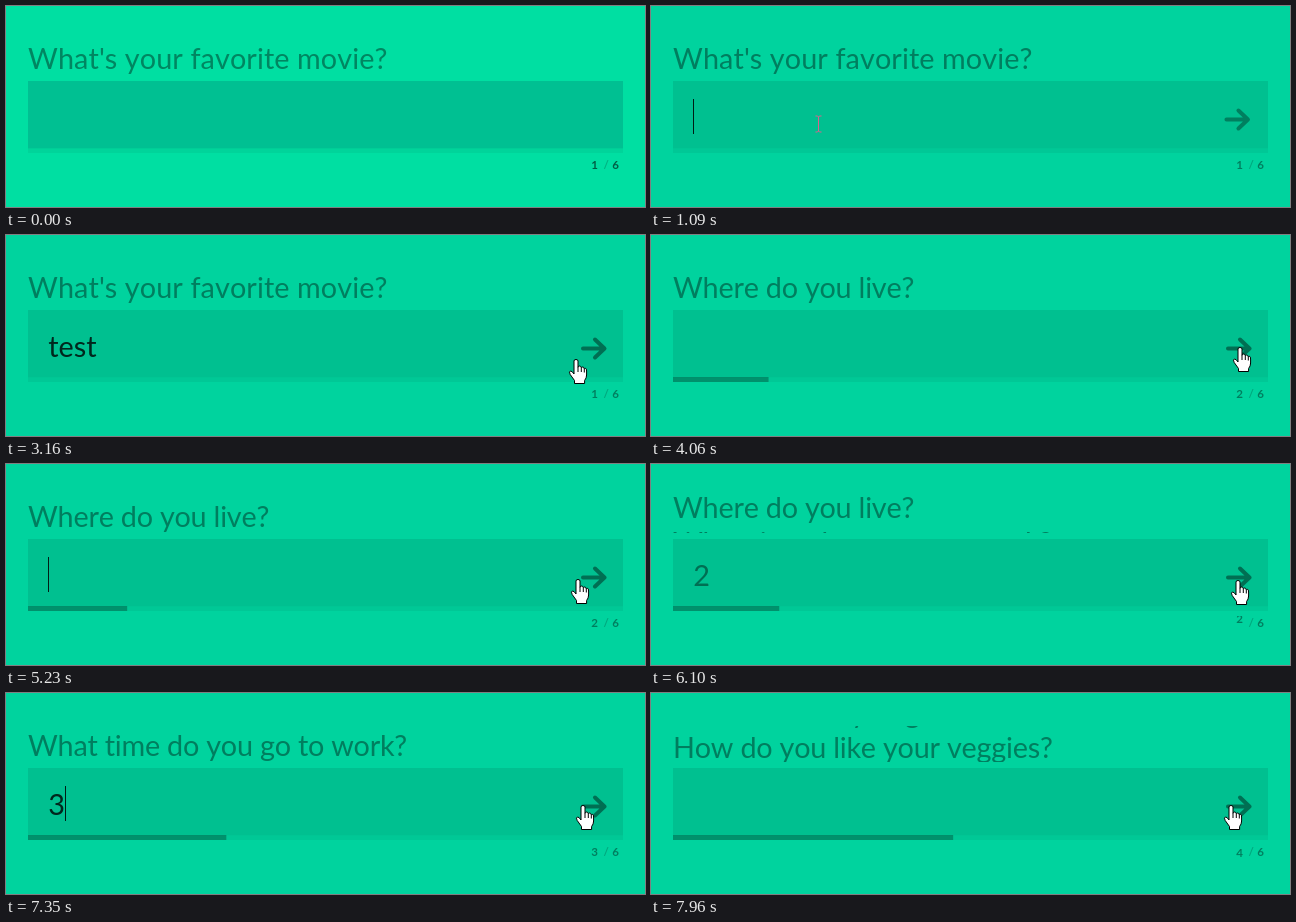
An HTML page for the animation above (8000 ms loop, 639 by 201 pixels).

```html
<!DOCTYPE html>
<html lang="en">
<head>
<meta charset="utf-8">
<title>Minimal form</title>
<style>
  html, body { margin: 0; width: 100%; height: 100%; overflow: hidden; background: #00d39e; }
  svg { display: block; width: 639px; height: 201px; }
  text { font-family: Lato, sans-serif; font-size: 28.8px; font-kerning: none; white-space: pre; }
  .title { fill: rgba(0, 0, 0, .4); letter-spacing: -.23px; }
  .title.loose { letter-spacing: .09px; }
  .value { fill: rgba(0, 0, 0, .8); }
  .num text { font-size: 11.52px; font-weight: 700; }
</style>
</head>
<body>
<svg viewBox="0 0 639 201">
  <defs>
    <clipPath id="titleClip"><rect x="20" y="33" width="600" height="36"/></clipPath>
    <clipPath id="numClip"><rect x="580" y="152" width="36" height="14"/></clipPath>
  </defs>
  <rect id="bg" width="639" height="201"/>
  <rect id="box" x="22" y="75" width="595" height="67.4"/>
  <rect x="22" y="142.4" width="595" height="4.6" fill="#000" fill-opacity=".05"/>
  <rect id="bar" x="22" y="142" width="0" height="5" fill="#000" fill-opacity=".28"/>
  <g clip-path="url(#titleClip)">
    <text id="oldTitle" x="22"/>
    <text id="newTitle" x="22"/>
  </g>
  <text id="value" class="value" x="42.2" y="122"/>
  <rect id="caret" y="93" width="1" height="35" fill="#000" fill-opacity=".85"/>
  <path id="next" d="M577 113.5H598M589 104.5L598.5 113.5 589 122.5" fill="none" stroke="#000"
        stroke-width="4" stroke-linecap="round" stroke-linejoin="round"/>
  <g id="num" class="num">
    <g clip-path="url(#numClip)">
      <text id="oldNum" x="585.3"/>
      <text id="newNum" x="585.3"/>
    </g>
    <text x="597.5" y="163" fill-opacity=".2">/</text>
    <text x="606.2" y="163">6</text>
  </g>
  <g id="ptr">
    <path id="beam" d="M-3 -8H-1L0 -7 1 -8H3M0 -7V7M-3 8H-1L0 7 1 8H3" fill="none" stroke="#d9628c"/>
    <path id="arrow" d="M0 0V16L4 12.5 6.5 18 9 17 6.5 11.5H11.5Z" fill="#fff" stroke="#000"/>
    <g id="hand" stroke="#000" stroke-linejoin="round">
      <path d="M-2 1Q-2 -.5 0 -.5 2 -.5 2 1V7.5Q2 6 3.7 6 5 6 5.3 7.8 5.6 7 6.8 7 8 7 8.3 9
               8.8 8.2 9.6 8.3 10.6 8.5 10.6 11V15Q10.6 18 8.6 20.5V23.5H-1.5V20.5L-5.8 14.5
               Q-7.4 11.5 -5.6 11 -4 10.8 -2 14Z" fill="#fff"/>
      <path d="M2 7.5V12M5.3 7.8V12M8.3 9V12.5" fill="none"/>
    </g>
  </g>
</svg>
<script>
const $ = id => document.getElementById(id);
const set = (id, attr, v) => $(id).setAttribute(attr, v);
const write = (id, s) => { if ($(id).textContent !== s) $(id).textContent = s; };
const show = (id, on) => { $(id).style.display = on ? "" : "none"; };
const clamp = v => Math.min(1, Math.max(0, v));
const ramp = (t, start, len) => clamp((t - start) / len);
const mix = (a, b, k) => a + (b - a) * k;
const rgb = (a, b, k) => `rgb(${a.map((v, i) => Math.round(mix(v, b[i], k)))})`;

function bezier(x1, y1, x2, y2) {
  const f = (a, b, u) => 3 * a * u * (1 - u) ** 2 + 3 * b * u * u * (1 - u) + u ** 3;
  return x => {
    let lo = 0, hi = 1;
    for (let i = 0; i < 24; i++) {
      const m = (lo + hi) / 2;
      if (f(x1, x2, m) < x) lo = m; else hi = m;
    }
    return f(y1, y2, (lo + hi) / 2);
  };
}
const ease = bezier(.25, .1, .25, 1);
const easeInOut = bezier(.42, 0, .58, 1);

const LOOP = 8000, SLIDE = 400;
const titles = ["What's your favorite movie?", "Where do you live?",
  "What time do you go to work?", "How do you like your veggies?"];
const clicks = [3715, 6026, 7677];
const typed = [[1710, "t"], [2020, "te"], [2260, "tes"], [2630, "test"], [5480, "2"], [7020, "3"]];
const focus = [[930, 3620], [4165, 5975], [6400, 7677]];
// time, x, y of the pointer's hot spot
const path = [[460, 240, 212], [760, 167, 118], [2690, 167, 118], [2890, 310, 186], [3010, 440, 172],
  [3150, 570, 125], [3170, 570, 125], [3330, 580, 111], [3430, 580, 111], [3520, 589, 113],
  [4270, 589, 113], [4390, 572, 116], [5450, 572, 116], [5540, 587, 123], [5690, 587, 123],
  [5780, 587, 117], [6750, 587, 117], [7000, 575, 113], [7320, 575, 113], [7350, 577, 113],
  [7380, 580, 113]];

function pointerAt(t) {
  const i = path.findIndex(p => p[0] > t);
  if (i < 0) return path[path.length - 1].slice(1);
  if (i === 0) return path[0].slice(1);
  const [a, b] = [path[i - 1], path[i]];
  const k = (t - a[0]) / (b[0] - a[0]);
  return [mix(a[1], b[1], k), mix(a[2], b[2], k)];
}

function drawTitle(id, i, y) {
  write(id, titles[i]);
  set(id, "class", i ? "title" : "title loose");
  set(id, "y", y);
}

function drawQuestion(t) {
  const n = clicks.filter(c => t >= c).length;
  const since = n ? t - clicks[n - 1] : SLIDE;
  const k = n ? ease(clamp(since / SLIDE)) : 1;
  const old = Math.max(0, n - 1);
  show("oldTitle", k < 1);
  drawTitle("oldTitle", old, 63 - 35 * k);
  drawTitle("newTitle", n, 63 + 35 * (1 - k));
  write("oldNum", n ? String(n) : "");
  write("newNum", String(n + 1));
  set("oldNum", "y", 163 - 14.4 * k);
  set("newNum", "y", 163 + 14.4 * (1 - k));
  set("bar", "width", n ? 595 / 6 * (old + easeInOut(clamp(since / SLIDE))) : 0);

  const fade = n ? 1 - clamp(since / 160) : 0;
  const from = fade > 0 ? (clicks[n - 2] || 0) : (clicks[n - 1] || 0);
  const last = typed.filter(e => e[0] <= t && e[0] > from).pop();
  write("value", last ? last[1] : "");
  set("value", "opacity", fade > 0 ? fade : 1);
}

function drawCaret(t) {
  const span = focus.find(f => t >= f[0] && t < f[1]);
  let on = false;
  if (span) {
    const reset = Math.max(span[0], ...typed.map(e => e[0]).filter(s => s <= t));
    on = (t - reset) % 1010 < 505;
    const w = $("value").textContent ? $("value").getComputedTextLength() : 0;
    set("caret", "x", Math.round(42.2 + w));
  }
  show("caret", on);
}

function drawPointer(t) {
  const [x, y] = pointerAt(t);
  const inBox = y >= 75 && y <= 147;
  const hand = inBox && x > 560;
  show("ptr", t >= 460);
  show("hand", hand);
  show("beam", inBox && !hand);
  show("arrow", !inBox);
  set("ptr", "transform", `translate(${Math.round(x) + (hand ? 0 : .5)} ${Math.round(y)})`);
}

function draw(t) {
  const dim = ramp(t, 460, 300);
  set("bg", "fill", rgb([0, 223, 162], [0, 211, 158], dim));
  set("box", "fill", rgb([0, 192, 146], [0, 192, 144], dim));
  set("num", "fill-opacity", mix(.58, .4, dim));
  const shown = ease(ramp(t, 940, 300));
  set("next", "stroke-opacity", .42 * shown);
  set("next", "transform", `translate(${-8 * (1 - shown)} 0)`);
  drawQuestion(t);
  drawCaret(t);
  drawPointer(t);
}

const start = performance.now();
function tick() {
  draw((performance.now() - start) % LOOP);
  requestAnimationFrame(tick);
}
draw(0);
requestAnimationFrame(tick);
</script>
</body>
</html>
```
